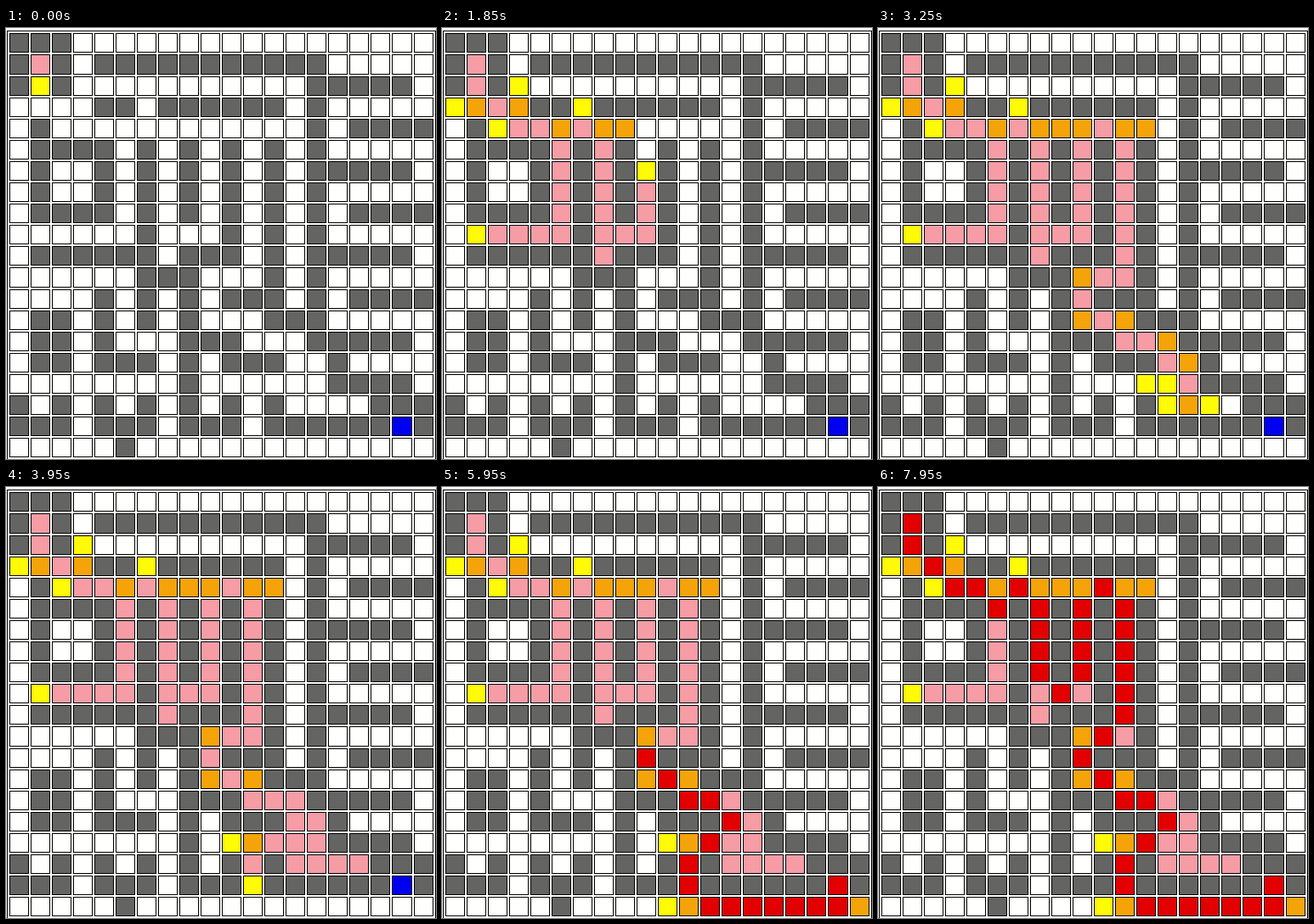
Recreate the animation shown at these times as an HTML page with a canvas. Size 506x508 px, loop 8 s.

```html
<!DOCTYPE html>
<html lang="en">
<head>
<meta charset="utf-8">
<title>Maze search</title>
<style>
  html, body { margin: 0; width: 100%; height: 100%; overflow: hidden; background: #fff; }
  canvas { display: block; }
</style>
</head>
<body>
<canvas id="stage" width="506" height="508"></canvas>
<script>
const MAZE = [
  '###.................',
  '#.#.###########.....',
  '#.#...........#####.',
  '....##.######.#.....',
  '.#............#.####',
  '.####.#.#.#.#.#.....',
  '.#..#.#.#.#.#.#####.',
  '.#..#.#.#.#.#.#.....',
  '.####.#.#.#.#.#.####',
  '......#...#.#.#.....',
  '.######.###.#.#####.',
  '......###...#.#.....',
  '....#.#.#.###.#.####',
  '.##.#.#.#...###.....',
  '.##.#...###...#####.',
  '.##.###.#.###..#....',
  '........#......####.',
  '#.#.#.#.#.#.#....###',
  '###.###.###.######.#',
  '.....#..............'
];
const COLORS = {
  free: '#fffffd', wall: '#646463', goal: '#0000f0', visited: '#f59ca5',
  open: '#fffa05', second: '#f4a409', path: '#e20000'
};
const LOOP = 8000, STEP = 80, LEAD = 10, GAP = 2;

const cells = MAZE.flatMap((row, y) => [...row].map((mark, x) => ({
  x, y, base: mark === '#' ? 'wall' : 'free', closed: false, seen: false, parent: null
})));
const at = (x, y) => x >= 0 && y >= 0 && x < 20 && y < 20 ? cells[y * 20 + x] : null;
const start = at(1, 1), goal = at(18, 18);
goal.base = 'goal';
const distance = c => (c.x - goal.x) ** 2 + (c.y - goal.y) ** 2;
const byDistance = (a, b) => distance(a) - distance(b);

function neighbours(cell) {
  const found = [];
  for (let dy = -1; dy <= 1; dy++) {
    for (let dx = -1; dx <= 1; dx++) {
      const next = at(cell.x + dx, cell.y + dy);
      if (!next || next.base === 'wall' || next.closed) continue;
      if (next === goal && dx && dy) continue; // the goal is entered straight only
      found.push(next);
    }
  }
  return found.sort(byDistance);
}

// Greedy best-first search; every step is a list of [cell, colour name].
function search() {
  const steps = [], open = [start];
  start.seen = true;
  while (open.length) {
    const cell = open.sort(byDistance).shift();
    if (cell === goal) break;
    cell.closed = true;
    const changes = [[cell, 'visited']];
    neighbours(cell).forEach((next, rank) => {
      if (next !== goal && (rank < 2 || !next.seen)) {
        changes.push([next, rank === 1 ? 'second' : 'open']);
      }
      if (!next.seen) {
        next.seen = true;
        next.parent = cell;
        open.push(next);
      }
    });
    steps.push(changes);
  }
  steps.push([]);
  for (let c = goal; c; c = c.parent) steps.push([[c, 'path']]);
  return steps;
}

const steps = search();
const ctx = document.getElementById('stage').getContext('2d');

// Cell edges snap to whole pixels.
const leftOf = x => Math.floor(4.4 + 25.033 * x);
const topOf = y => Math.floor(6.85 + 25.1 * y);

function drawCell({ x, y }, color) {
  const left = leftOf(x), top = topOf(y);
  const width = leftOf(x + 1) - GAP - left, height = topOf(y + 1) - GAP - top;
  ctx.fillStyle = '#000';
  ctx.fillRect(left, top, width, height);
  ctx.fillStyle = COLORS[color];
  ctx.fillRect(left + 1, top + 1, width - 2, height - 2);
}

function draw(last) {
  ctx.fillStyle = '#fff';
  ctx.fillRect(0, 0, 506, 508);
  ctx.strokeStyle = '#000';
  ctx.strokeRect(1.5, 3.5, 504, 510);
  cells.forEach(c => drawCell(c, c.base));
  steps.slice(0, last + 1).flat().forEach(([c, color]) => drawCell(c, color));
}

let shown = -1;
const begin = performance.now();
function tick() {
  const time = (performance.now() - begin) % LOOP;
  const step = Math.floor((time + LEAD) / STEP);
  if (step !== shown) draw(shown = step);
  requestAnimationFrame(tick);
}
tick();
</script>
</body>
</html>
```
